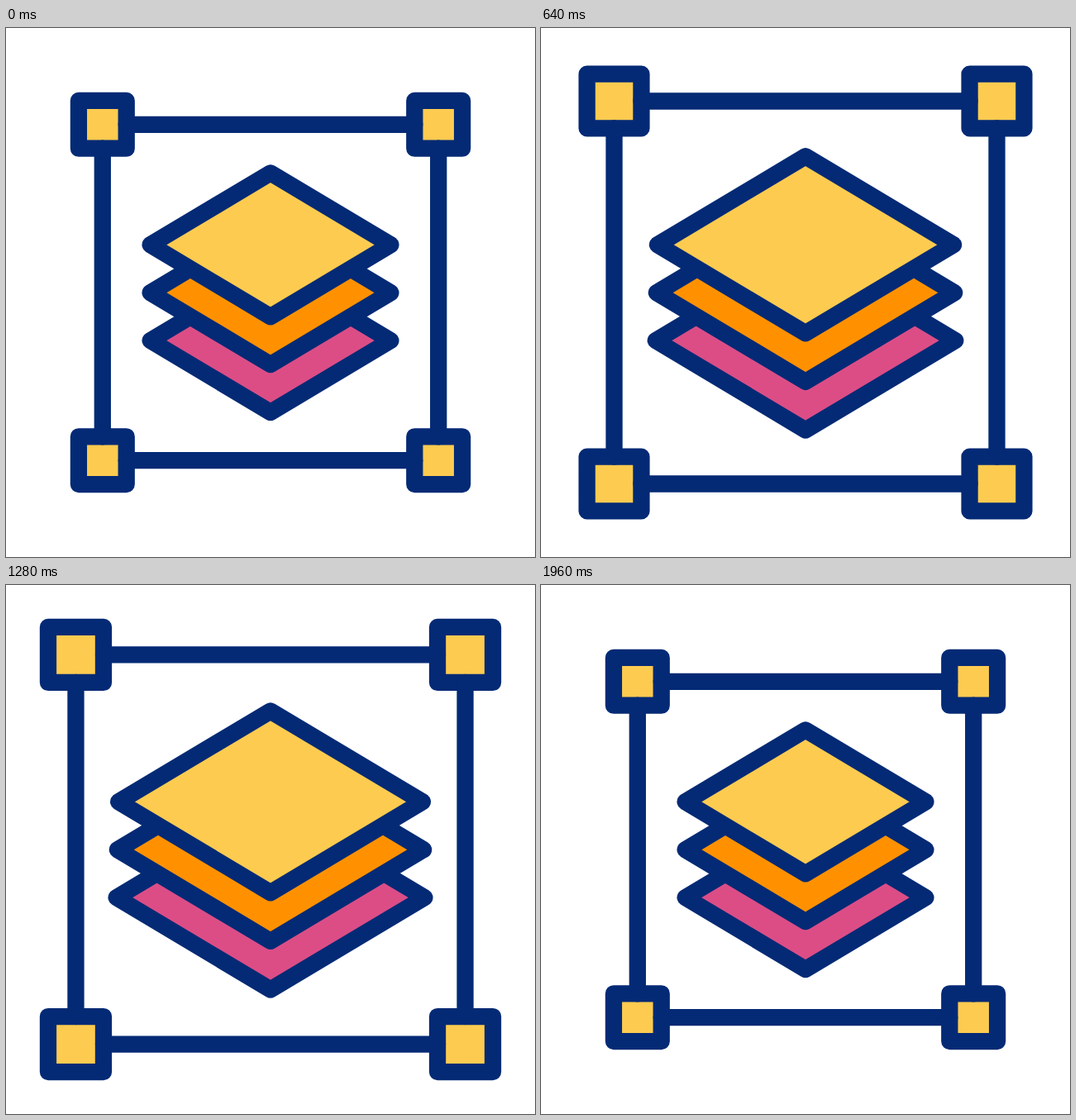
Recreate the animation shown at these times as an HTML page. Size 640x640 px, loop 2.48 s.

```html
<!DOCTYPE html>
<html lang="en">
<head>
<meta charset="utf-8">
<title>Layers in a resizing frame</title>
<style>
  html, body { margin: 0; width: 100%; height: 100%; overflow: hidden; background: #fff; }
  svg { display: block; width: 100%; height: 100%; }
</style>
</head>
<body>
<svg viewBox="0 0 640 640">
  <g id="art" stroke="#042a75" stroke-width="20.3" stroke-linecap="round" stroke-linejoin="round"></g>
</svg>
<script>
const LOOP = 2480, STEP = 40;
const START = 40, PEAK = 1000, END = 1960;
const CENTER = 320;
const YELLOW = '#fdcb50';
const FRAME = { half: 203.2, handle: 28.9, grow: 0.1805 };
const DIAMOND = { w: 145.4, h: 86.9 };
const LAYERS = [
  { y: 378.1, grow: 0.32, fill: '#dc4d86' },
  { y: 320.2, grow: 0.31, fill: '#ff9100' },
  { y: 262.3, grow: 0.30, fill: YELLOW },
];
const CORNERS = [[-1, -1], [1, -1], [1, 1], [-1, 1]];

const art = document.getElementById('art');

function addPath(fill) {
  const path = document.createElementNS('http://www.w3.org/2000/svg', 'path');
  path.setAttribute('fill', fill);
  return art.appendChild(path);
}

const handles = addPath(YELLOW);
const bars = addPath('none');
const diamonds = LAYERS.map(layer => addPath(layer.fill));

// Symmetric ease-in-out, equal to cubic-bezier(.6, 0, .4, 1).
function ease(x) {
  if (x <= 0) return 0;
  if (x >= 1) return 1;
  let lo = 0, hi = 1;
  for (let i = 0; i < 30; i++) {
    const u = (lo + hi) / 2, v = 1 - u;
    if (1.8 * u * v * v + 1.2 * u * u * v + u * u * u < x) lo = u;
    else hi = u;
  }
  return lo * lo * (3 - 2 * lo);
}

function growth(t) {
  return t < PEAK
    ? ease((t - START) / (PEAK - START))
    : ease((END - t) / (END - PEAK));
}

function polygon(points) {
  return 'M' + points.map(p => p.map(n => n.toFixed(3)).join(' ')).join('L') + 'Z';
}

function render(t) {
  const p = growth(t);
  const scale = 1 + FRAME.grow * p;
  const half = FRAME.half * scale, size = FRAME.handle * scale;
  const reach = half - size;

  handles.setAttribute('d', CORNERS.map(([cx, cy]) =>
    polygon(CORNERS.map(([x, y]) => [
      CENTER + cx * half + x * size,
      CENTER + cy * half + y * size,
    ]))).join(''));

  bars.setAttribute('d', [-1, 1].map(side => {
    const at = CENTER + side * half;
    const from = CENTER - reach, to = CENTER + reach;
    return `M${from} ${at}H${to}M${at} ${from}V${to}`;
  }).join(''));

  LAYERS.forEach(({ y, grow }, i) => {
    const k = 1 + grow * p, w = DIAMOND.w * k, h = DIAMOND.h * k;
    diamonds[i].setAttribute('d', polygon([
      [CENTER, y - h], [CENTER + w, y], [CENTER, y + h], [CENTER - w, y],
    ]));
  });
}

const begin = performance.now();

function tick() {
  const t = (performance.now() - begin) % LOOP;
  render(Math.floor(t / STEP) * STEP);
  requestAnimationFrame(tick);
}

tick();
</script>
</body>
</html>
```
